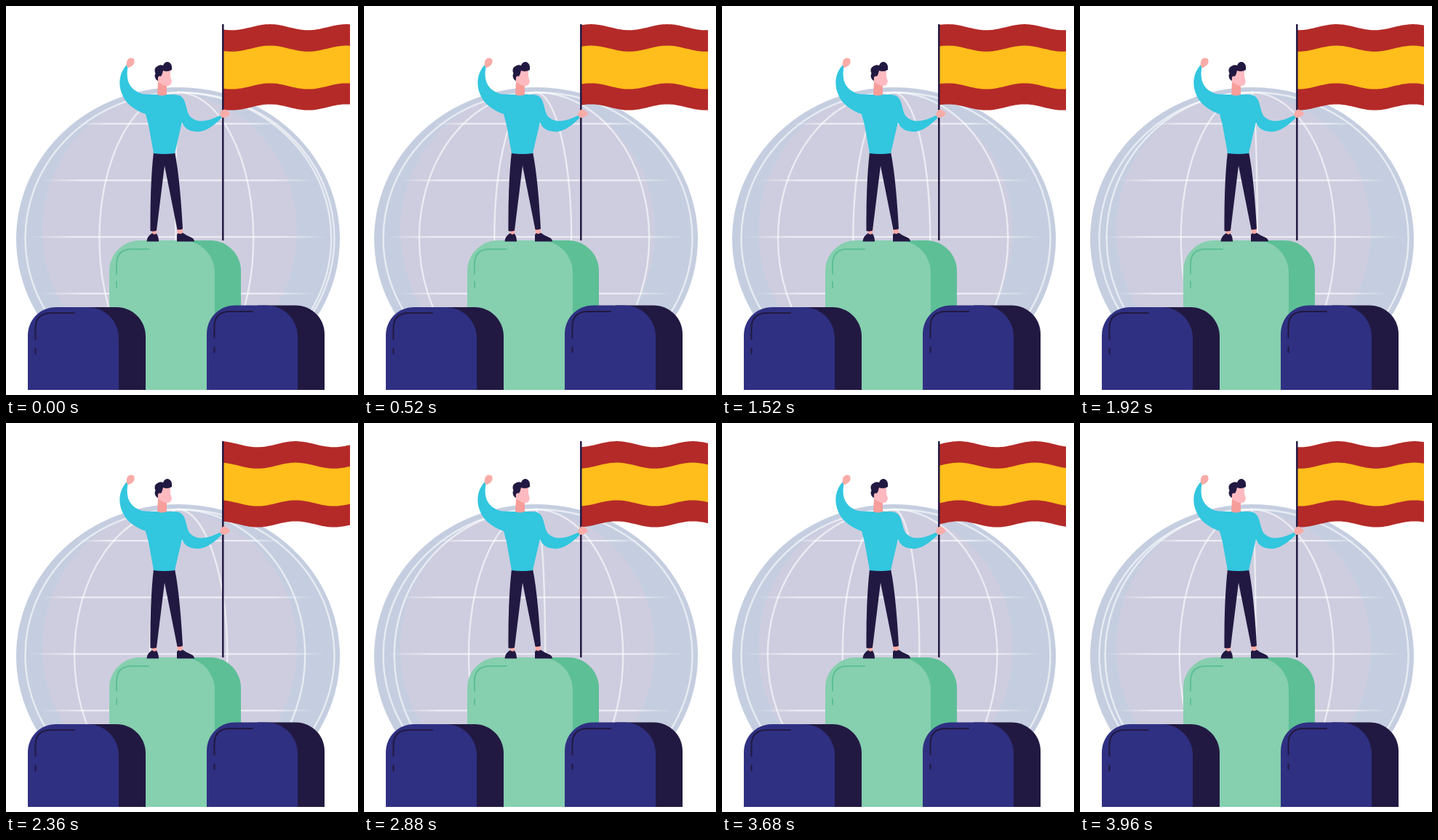
Recreate the animation shown at these times as an HTML page. Size 484x536 px, loop 4 s.

```html
<!DOCTYPE html>
<html lang="en">
<head>
<meta charset="utf-8">
<title>Winner on the podium</title>
<style>
  html, body { margin: 0; width: 100%; height: 100%; overflow: hidden; background: #fff; }
  svg { display: block; width: 100%; height: 100%; }
  .line { fill: none; stroke-width: 2; stroke-linecap: round; }
  .navy { fill: #2f3082; }
  .dark { fill: #221942; }
  .face { fill: #ffbac1; }
  .hand { fill: #f9aca8; }
</style>
</head>
<body>
<svg viewBox="0 0 484 536">
  <defs>
    <linearGradient id="fade">
      <stop offset="0" stop-color="#fff" stop-opacity="0"/>
      <stop offset=".15" stop-color="#fff" stop-opacity=".6"/>
      <stop offset=".85" stop-color="#fff" stop-opacity=".6"/>
      <stop offset="1" stop-color="#fff" stop-opacity="0"/>
    </linearGradient>
    <clipPath id="horizon"><rect width="484" height="500"/></clipPath>
  </defs>

  <!-- globe -->
  <g clip-path="url(#horizon)">
    <ellipse cx="236.5" cy="321" rx="222.5" ry="209" fill="#c5cee0"/>
    <ellipse cx="225" cy="310" rx="175" ry="190" fill="#cecddf"/>
    <g fill="url(#fade)">
      <rect x="96" y="161" width="286" height="2.4"/>
      <rect x="48" y="239" width="376" height="2.4"/>
      <rect x="32" y="317" width="408" height="2.4"/>
      <rect x="48" y="395" width="376" height="2.4"/>
    </g>
    <g fill="none" stroke="#fff" stroke-opacity=".6" stroke-width="2.4">
      <ellipse cx="239" cy="320" rx="212.5" ry="201"/>
      <g id="meridians"></g>
    </g>
  </g>

  <!-- podium -->
  <path fill="#5dbf96" d="M240 323H281C304 323 323 342 323 365V529H240Z"/>
  <path fill="#86cfaf" d="M142 529V365C142 342 161 323 184 323H242C267 323 287 343 287 368V529Z"/>
  <path class="line" stroke="#5dbf96" d="M196 335H173Q152 335 152 356V369M152 380V388"/>
  <g>
    <path class="dark" d="M100 415H152C174 415 192 433 192 455V529H100Z"/>
    <path class="navy" d="M30 529V454C30 432 47 415 69 415H112C136 415 155 434 155 458V529Z"/>
    <path class="line" stroke="#221942" d="M94 423H62Q40.500 423 40.500 444V459M40.500 472V479"/>
  </g>
  <g>
    <path class="dark" d="M346 412.500H398C420 412.500 438 430 438 452V529H346Z"/>
    <path class="navy" d="M276 529V452C276 430 293 412.500 315 412.500H358C382 412.500 401 432 401 456V529Z"/>
    <path class="line" stroke="#221942" d="M339 421H308Q286.500 421 286.500 442V457M286.500 470V477"/>
  </g>

  <!-- flag -->
  <path id="cloth" fill="#b42a28"/>
  <path id="band" fill="#ffbe1b"/>
  <path class="line" stroke="#221942" style="stroke-width:2.500" d="M298.300 26V322"/>

  <!-- winner -->
  <path class="hand" d="M200 307H207.500L207 316H201ZM235 306H243L243 315H236Z"/>
  <path class="dark" d="M203 201Q198 245 198.500 310Q203 311 207 309.500L218 220L235.500 308Q239 309 243 307Q239 235 232 201Z"/>
  <path class="dark" d="M193.500 324.500Q194 317 201 313Q204 316 207 313.500Q210.500 319 210 324.500ZM235 324.500V315L237 313Q240 315 243 312.500Q249 317 255 319Q259 321 259 324.500Z"/>
  <path fill="#f79d9a" d="M209 104L208 124Q215 126 221 123V108Z"/>
  <path class="face" d="M210 92Q217 84 226 89L226 97L228 104L226 109Q219 112 213 107Q207 105 207 98Z"/>
  <path class="dark" d="M207 102Q203 97 205.500 93Q202.500 86 208 83Q212 80 216 82Q218 76.500 223 77Q229 79 228 88Q222 91.500 216 89Q215 94 213 97Q208 95 209 103Z"/>
  <path fill="#32c6df" d="M166 81C156 92 154 107 159 120C164 135 178 144 192 149L196 164L203 203Q218 205 232 203L242 160C246 171 256 174 267 173C280 171 290 160 299 152L297 149.500C280 158 263 164 252 151C247 142 248 129 240 124Q236 121.500 228 122H221Q214 125 208 122Q195 122 187 121C168 115 164 100 168 82Z"/>
  <path class="hand" d="M166 83Q165 76 168 73Q172 70 176 73Q178 78 174 82Q170 85 168 85Z"/>
  <path class="hand" d="M294 151Q295 143 300 142.500Q306 144 308 149Q304 154 297 154Z"/>
</svg>
<script>
  const LOOP = 4000, STEP = 40, TURNS_PER_STEP = 0.0396;
  const globe = { pole: 236, top: 119, bottom: 521, ry: 201 };
  const flag = { left: 299, right: 473, wave: 105, crest: 363, height: 4.1 };
  // Equator crossings of a meridian after each whole turn, right to left.
  const crossings = [451, 344, 237, 132, 30];
  const byId = id => document.getElementById(id);

  const meridians = crossings.slice(1).map(() =>
    byId('meridians').appendChild(document.createElementNS('http://www.w3.org/2000/svg', 'path')));

  // Half ellipse from pole to pole that crosses the equator at x.
  function meridianPath(x) {
    const rx = Math.max(Math.abs(x - globe.pole), 0.01);
    const sweep = x > globe.pole ? 1 : 0;
    return `M${globe.pole} ${globe.top}A${rx} ${globe.ry} 0 0 ${sweep} ${globe.pole} ${globe.bottom}`;
  }

  function wavyEdge(y, turns) {
    const points = [];
    for (let x = flag.left; x <= flag.right; x += 2) {
      const angle = 2 * Math.PI * ((x - flag.crest) / flag.wave - turns);
      points.push(`${x} ${(y - flag.height * Math.cos(angle)).toFixed(2)}`);
    }
    return points;
  }

  const stripe = (top, bottom, turns) =>
    `M${wavyEdge(top, turns).concat(wavyEdge(bottom, turns).reverse()).join('L')}Z`;

  function draw(time) {
    const turns = Math.floor((time % LOOP) / STEP) * TURNS_PER_STEP;
    const phase = (turns + 0.035) % 1;
    meridians.forEach((path, i) => {
      const x = crossings[i] + (crossings[i + 1] - crossings[i]) * phase;
      path.setAttribute('d', meridianPath(x));
    });
    byId('cloth').setAttribute('d', stripe(29.2, 139.5, turns));
    byId('band').setAttribute('d', stripe(58.7, 110.5, turns));
  }

  function tick() {
    draw(performance.now());
    requestAnimationFrame(tick);
  }
  tick();
</script>
</body>
</html>
```
